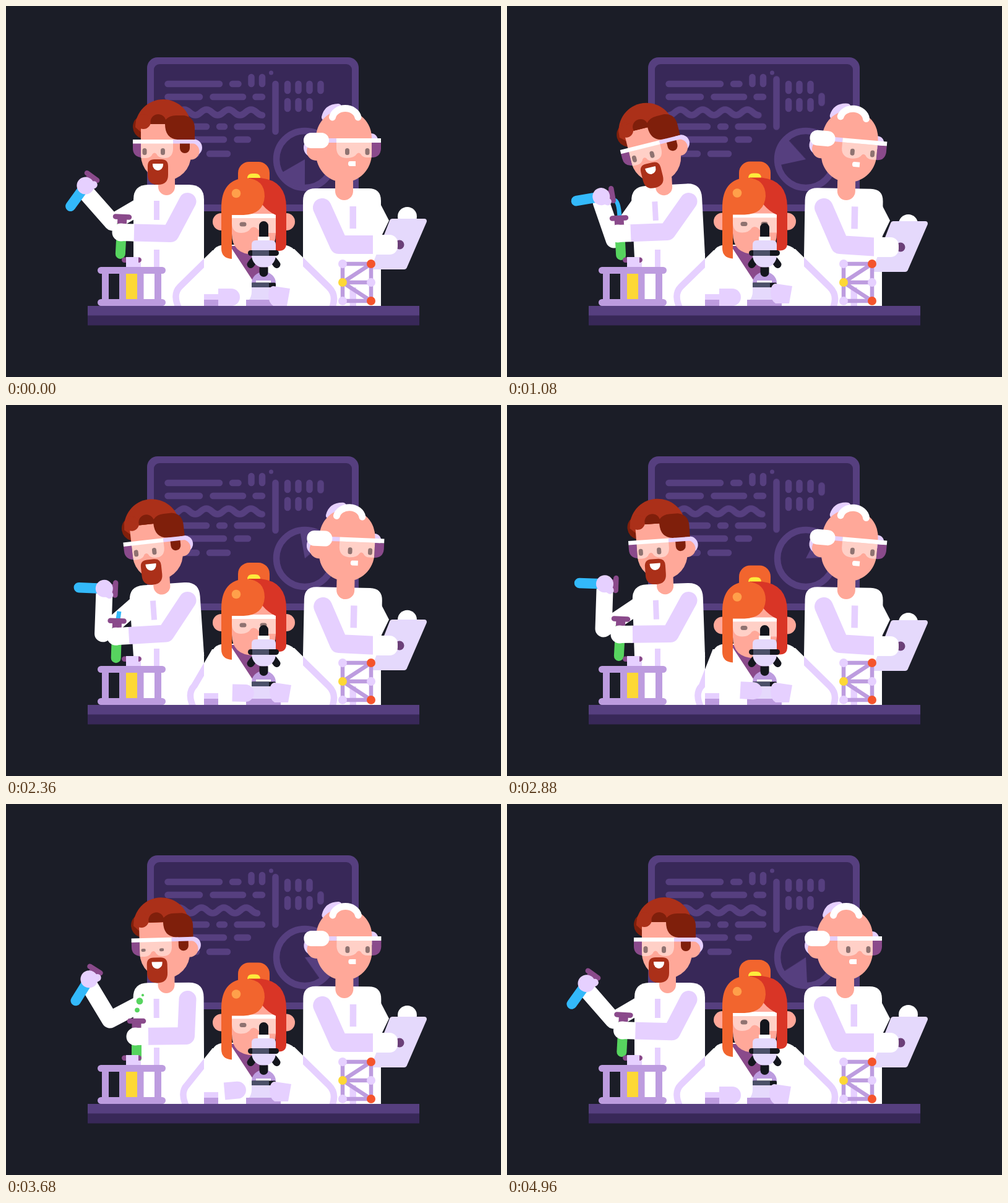
An HTML page that plays this animation: 800 px wide and 600 px high, repeating every 5000 ms.

```html
<!DOCTYPE html>
<html lang="en">
<head>
<meta charset="utf-8">
<title>Laboratory</title>
<style>
  html, body { margin: 0; width: 100%; height: 100%; overflow: hidden; background: #1b1d27; }
  svg { display: block; width: 100vw; height: 100vh; }
  .ln { fill: none; stroke-linecap: round; stroke-linejoin: round; }
  .white { fill: #fff; }
  .skin { fill: #ffa899; }
  .lav { fill: #e6d0ff; }
  .pale { fill: #e5d9fc; }
  .lilac { fill: #bd9cdf; }
  .plum { fill: #8a4a8b; }
  .black { fill: #14161d; }
  .slate { fill: #4b5068; }
  .glass { fill: #fff; opacity: .45; }
  .eye { fill: #8f7371; }
  .rust { fill: #ab3019; }
  .brown { fill: #7f1f0b; }
  .orange { fill: #f2652e; }
  .red { fill: #d93526; }
  .mid { fill: #563f7f; }
  .deep { fill: #382858; }
  .chalk { stroke: #563f7f; stroke-width: 10.5; }
  .sleeve { stroke: #e6d0ff; }
  .coat { stroke: #fff; }
  .green { fill: #57d45f; }
  #wedge { transform-origin: 483px 248px; animation: spin 5s linear infinite; }
  #wave { animation: left 1.25s cubic-bezier(.37,0,.63,1) infinite alternate; }
  #bar { animation: up 1.25s cubic-bezier(.37,0,.63,1) infinite alternate; }
  #pill { animation: down 1.25s cubic-bezier(.37,0,.63,1) infinite alternate; }
  @keyframes spin { to { transform: rotate(360deg); } }
  @keyframes left { to { transform: translateX(-8px); } }
  @keyframes up { to { transform: translateY(-8px); } }
  @keyframes down { to { transform: translateY(20.5px); } }
</style>
</head>
<body>
<svg viewBox="0 0 800 600">
  <defs>
    <clipPath id="coats"><path d="M200 380H320V485H200zM480 380H606V485H480z"/></clipPath>
  </defs>
  <rect width="800" height="600" fill="#1b1d27"/>

  <!-- board -->
  <rect class="mid" x="228" y="83" width="342" height="249" rx="17"/>
  <rect class="deep" x="239" y="94" width="320" height="227" rx="9"/>
  <g class="ln chalk">
    <path d="M261.500 126H345M366 126H375.500M396.500 115V126M414 115V126M261.500 147H313M334.500 147H383M403.500 147H414"/>
    <path d="M261.500 195H324M345 195H353M373.500 195H414M261.500 216H352M373.500 216H391M261.500 239H308M329 239H358"/>
    <path d="M455 126V137M472.500 126V137M490.500 126V137M455 154V166M472.500 154V166M490.500 154V166"/>
    <path id="wave" d="M270 176.500c8 0 10-9 18-9s10 9 18 9 10-9 18-9 10 9 18 9 10-9 18-9 10 9 18 9 10-9 18-9 10 9 18 9"/>
    <path id="bar" d="M435.500 126V203"/>
    <path id="pill" d="M508.500 126V137"/>
    <circle cx="483" cy="248" r="46"/>
  </g>
  <circle class="mid" cx="428.500" cy="108" r="3.500"/>
  <path id="wedge" class="mid" d="M483 248V295A47 47 0 0 1 442.300 271.500z"/>

  <!-- bearded man -->
  <path id="farArm" class="ln coat" stroke-width="27"/>
  <path class="white" d="M206 400H320V485H206z"/>
  <g id="manBody">
    <path class="white" d="M206 410V313Q206 289 230 289H296Q320 289 320 313V410z"/>
    <path class="lav" d="M239 315h9v31h-9z"/>
    <rect class="skin" x="246" y="265" width="27" height="41" rx="13.500"/>
  </g>
  <path class="lav" d="M239 394h9v30h-9z"/>
  <g id="manHead">
    <circle class="lav" cx="303.500" cy="229" r="13.500"/>
    <circle class="skin" cx="299" cy="235" r="13.500"/>
    <path class="brown" d="M226 178H218Q205 182 205 196Q206 209 218 214L232 200z"/>
    <path class="rust" d="M209 196A45 45 0 0 1 299 196L270 204H218z"/>
    <path class="skin" d="M218 191H299V241A40.500 41 0 0 1 218 241z"/>
    <circle class="rust" cx="222" cy="187" r="12"/>
    <path class="rust" d="M214 178H262V191H230z"/>
    <path class="brown" d="M234 191A12 12 0 0 1 258 184Q264 177 275 177H288Q305 180 305 198V216H277Q257 214 257 191z"/>
    <path class="brown" d="M281 214h16v16a8 8 0 0 1-16 0z"/>
    <path class="plum" d="M205 222H218V245Q205 243 205 230z"/>
    <path class="glass" d="M218 222H270V232Q269 246 256 246Q246 246 243 239Q240 236 237 239Q234 246 226 246H218z"/>
    <rect class="lav" x="270" y="216" width="35" height="6.500"/>
    <rect class="white" x="205" y="216" width="65" height="6.500"/>
    <g id="manEyes">
      <rect class="eye" x="220.500" y="230" width="7" height="11" rx="3.500"/>
      <rect class="eye" x="250" y="230" width="7" height="11" rx="3.500"/>
    </g>
    <path class="rust" d="M229 259Q229 248 240 248H251Q262 248 262 259V273Q262 289 245.500 289Q229 289 229 273z"/>
    <path class="white" d="M237 255H254V257A8.500 9 0 0 1 237 257z"/>
  </g>
  <path id="stream" fill="none" stroke="#33b9fa" stroke-width="7" pathLength="1" stroke-dasharray="1 1"/>
  <g id="flask">
    <path class="ln" d="M16 0H59" stroke="#33b9fa" stroke-width="16.500"/>
    <rect class="plum" y="-7.500" width="13" height="15"/>
    <path class="ln" d="M0 -10V10" stroke="#8a4a8b" stroke-width="8.500"/>
    <path class="ln sleeve" d="M16 -6L9 -10" stroke-width="12"/>
    <circle class="lav" cx="18" r="14"/>
  </g>
  <g class="green"><circle class="bub"/><circle class="bub"/><circle class="bub"/></g>
  <path id="nearArm" class="ln sleeve" stroke-width="28"/>
  <g id="tube">
    <path class="green" d="M-8 11H8V60a8 8 0 0 1-16 0z"/>
    <rect class="plum" x="-7.500" width="15" height="12"/>
    <path class="ln" d="M-11 0H11" stroke="#8a4a8b" stroke-width="8.500"/>
  </g>
  <path id="cuff" class="coat" stroke-width="28"/>
  <circle id="glove" class="white" r="14.500"/>

  <!-- older man -->
  <path class="white" d="M480 400H606V485H480z"/>
  <g id="oldBody">
    <path class="white" d="M480 410V315Q480 295 500 295H586Q606 295 606 315V410z"/>
    <path class="lav" d="M555.500 324h10.500v36h-10.500z"/>
    <rect class="skin" x="532" y="270" width="29" height="44" rx="14.500"/>
  </g>
  <path class="lav" d="M555.500 455h10.500v30h-10.500z"/>
  <g id="oldHead">
    <circle class="lav" cx="590" cy="217" r="11"/>
    <circle class="lav" cx="497" cy="229" r="16"/>
    <circle class="skin" cx="501" cy="235" r="15"/>
    <path class="ln sleeve" d="M515.500 180Q519 164 537 163.500" stroke-width="11"/>
    <path class="skin" d="M501 213A45 45 0 0 1 591 213V239A45 46 0 0 1 501 239z"/>
    <path class="ln coat" d="M527.500 180A21 17 0 0 1 569 180" stroke-width="11"/>
    <path class="plum" d="M591 221H606V231Q605 245 591 245z"/>
    <path class="glass" d="M534 221H591V245H584Q576 245 573 239Q570 236 567 239Q563 246 550 246Q535 245 534 231z"/>
    <rect class="lav" x="518" y="214" width="16" height="7"/>
    <rect class="white" x="534" y="214" width="72" height="7"/>
    <rect class="white" x="481" y="205" width="41" height="25" rx="12"/>
    <rect class="eye" x="548" y="230" width="7" height="11" rx="3.500"/>
    <rect class="eye" x="580.500" y="230" width="7" height="11" rx="3.500"/>
    <path class="white" d="M556 251H565V259H556Q553 259 553 255Q553 251 556 251z"/>
  </g>
  <path class="white" d="M604 318L619 347L604 378z"/>
  <circle id="fingers" class="white" cx="648.500" cy="340.500" r="15.500"/>
  <g id="clip">
    <path class="pale" d="M624 348H676L644 422H595z" stroke="#e5d9fc" stroke-width="8" stroke-linejoin="round"/>
    <circle cx="636" cy="386" r="7.500" fill="#6b3f78"/>
  </g>
  <path id="oldArm" class="ln sleeve" stroke-width="30"/>
  <g id="oldGlove">
    <rect class="white" x="593" y="370" width="40" height="32" rx="13"/>
    <rect class="white" x="593" y="370" width="20" height="32"/>
  </g>

  <!-- woman -->
  <path id="armFill" class="white coat" stroke-width="10"/>
  <path id="armEdge" class="ln sleeve" stroke-width="10.500" clip-path="url(#coats)"/>
  <path class="white" d="M331 485V412Q331 386 355 386H447Q471 388 471 412V485z"/>
  <path class="plum" d="M362 388L400 446H412L438 388z"/>
  <g id="girl">
    <rect class="orange" x="375" y="252" width="51" height="45" rx="18"/>
    <path d="M390 281V279Q390 271 398 271H403Q411 271 411 279V281z" fill="#fdeb3b"/>
    <circle class="skin" cx="348" cy="349" r="14"/>
    <circle class="skin" cx="453" cy="349" r="14"/>
    <path class="skin" d="M365 310H436V368Q436 402 400 402Q365 401 365 368z"/>
    <path class="glass" d="M365 343H436V367H422Q410 366 405 359Q400 356 396 359Q391 367 380 367Q366 367 365 352z"/>
    <rect class="white" x="365" y="336" width="71" height="7"/>
    <rect class="eye" x="377.500" y="349.500" width="11" height="7" rx="3.500"/>
    <rect class="eye" x="410.500" y="349.500" width="11" height="7" rx="3.500"/>
    <path class="red" d="M392 278H411Q453 282 453 326V384Q453 396 441 396H436V338Q424 333 414 321L392 310z"/>
    <path class="orange" d="M348 326Q348 280 388 278Q418 280 418 308Q416 337 384 338H365V409Q348 408 348 392z"/>
    <circle cx="372" cy="303" r="7.300" fill="#ffa04a"/>
  </g>
  <rect class="lav" x="320" y="466" width="23" height="10"/>
  <rect class="lilac" x="320" y="475" width="23" height="10"/>

  <!-- microscope -->
  <path id="ocular" class="black" d="M409 380V355.500a7.500 7.500 0 0 1 15 0V380z"/>
  <rect class="white" x="407" y="373" width="19" height="9"/>
  <path class="ln" d="M400 412L395.500 418M433 412L437.500 418" stroke="#14161d" stroke-width="12"/>
  <path class="pale" d="M397 396V386Q397 379 404 379H429Q436 379 436 386V403A19.500 20 0 0 1 397 403z"/>
  <rect class="black" x="391" y="395" width="50" height="9" rx="4.500"/>
  <rect class="slate" x="398" y="395" width="27" height="9"/>
  <path d="M397 448A19.500 18 0 0 1 436 448z" class="lilac"/>
  <path class="black" d="M409.500 422.500H423.500V431a7 7 0 0 1-14 0z"/>
  <rect class="white" x="404" y="444" width="24" height="4"/>
  <rect class="black" x="397" y="447.500" width="39" height="7.500" rx="2"/>
  <rect class="slate" x="397" y="447.500" width="28" height="7.500"/>
  <path class="pale" d="M397 455H436V476H392Q397 470 397 462z"/>
  <rect class="lilac" x="388" y="475" width="56" height="10"/>
  <path id="leftHand" class="lav" d="M343 457H364A14 14 0 0 1 364 485H343z"/>
  <path id="rightHand" class="lav" d="M432 453L459 457L454 485H432Q424 480 424 467Q425 453 432 453z"/>

  <!-- rack -->
  <rect class="plum" x="187" y="406.500" width="32" height="8.500" rx="4.200"/>
  <path class="lav" d="M194 406H214V415H218V424H194z"/>
  <rect x="166" y="433" width="17" height="42" fill="#1b1d27"/>
  <rect x="194" y="433" width="18" height="42" fill="#fdd835"/>
  <path class="lilac" d="M155 428h11v50h-11zM183 428h11v50h-11zM212 428h10.500v50h-10.500zM240 428h11v50h-11z"/>
  <rect class="lilac" x="148" y="422" width="110" height="11" rx="5.500"/>
  <rect class="lilac" x="148" y="474" width="110" height="11" rx="5.500"/>

  <!-- molecule -->
  <path d="M544 417H590V477H544zM590 417L544 447L590 477M544 447H590" fill="none" stroke="#bd9cdf" stroke-width="6.500"/>
  <g class="lav"><circle cx="544" cy="417" r="7"/><circle cx="590" cy="447" r="7"/><circle cx="544" cy="477" r="7"/></g>
  <g fill="#f4542c"><circle cx="590" cy="417" r="7"/><circle cx="590" cy="477" r="7"/></g>
  <circle cx="544" cy="447" r="7" fill="#fdd835"/>

  <!-- table -->
  <rect class="mid" x="132" y="485" width="536" height="16"/>
  <rect class="deep" x="132" y="500.500" width="536" height="16"/>
</svg>
<script>
const LOOP = 5000;
const BEATS = [0, 1080, 1880, 2880, 3680, 4280];
const POUR = [0, 600, 1080, 1880, 2880, 3680, 4280];
const $ = id => document.getElementById(id);
const set = (id, name, value) => $(id).setAttribute(name, value);
const move = (id, value) => set(id, 'transform', value);
const clamp = v => Math.max(0, Math.min(1, v));

// Periodic monotone cubic through the given values.
function track(v, times = BEATS) {
  const n = v.length;
  const at = i => times[(i + n) % n] + LOOP * Math.floor(i / n);
  const val = i => v[(i + n) % n];
  const slope = i => (val(i + 1) - val(i)) / (at(i + 1) - at(i));
  const tangent = i => {
    const a = slope(i - 1), b = slope(i);
    return a * b <= 0 ? 0 : 2 * a * b / (a + b);
  };
  return t => {
    let i = n - 1;
    while (times[i] > t) i--;
    const h = at(i + 1) - at(i), u = (t - at(i)) / h, w = 1 - u;
    return val(i) * w * w * (1 + 2 * u) + val(i + 1) * u * u * (3 - 2 * u)
      + h * u * w * (tangent(i) * w - tangent((i + 1) % n) * u);
  };
}

const tracks = {
  lean: track([0, -6, -10, -4, -.5, 0]),
  nod: track([0, -14, -9, -4, -1.5, 0]),
  drop: track([0, 1.5, 0, 0, 0, 0]),
  capX: track([139, 165, 170, 177, 176, 144, 141], POUR),
  capY: track([276, 297, 305, 302, 290, 268, 271], POUR),
  tip: track([126, 156, 170, 182.5, 182, 122, 122], POUR),
  farX: track([172, 173, 158, 156, 168, 170]),
  farY: track([350, 378, 375, 362, 349, 350]),
  tubeX: track([188, 181, 178, 184, 211, 205]),
  tubeY: track([341, 343, 352, 346, 351, 350]),
  tubeTilt: track([3, -3, 0, 3, 0, 0]),
  elbowX: track([266, 259, 256, 264, 291, 284]),
  elbowY: track([368, 365, 369, 370, 375, 374]),
  oldLean: track([0, 2, 2.5, 2, .4, .5]),
  oldNod: track([0, 5, 0, 5, 0, 2]),
  clip: track([0, 4, 2, 4, 0, 2.5]),
  fingers: track([0, 12, 3, 11, 1, 9]),
  girl: track([0, -.5, -1, 7.5, 4.5, 2]),
  ocular: track([0, 3, 8, 8, 5, 2]),
  arm: track([0, 0, 10, 34, 12, 0]),
  handX: track([0, 0, 9, 34, 10, 0]),
  handY: track([0, 0, -1, -9, -8, 0]),
  handTilt: track([0, 0, 0, 3, -5, 0]),
  grip: track([0, 1, 1, 1, 1, 0])
};

// start time, x at the top of the rise, largest radius
const bubbles = [[3410, 216, 5.5], [3560, 212, 6.5], [3310, 221, 2.2]];
const dots = document.querySelectorAll('.bub');

const sway = (dx, x) => `rotate(${dx / 2} ${x} 405)`;
const blink = (t, mid) => clamp(1 - Math.abs(t - mid) / 120);

function drawMan(p, t) {
  move('manBody', sway(p.lean, 263));
  move('manHead', `translate(${p.lean} ${p.drop}) rotate(${p.nod} 260 290)`);
  move('manEyes', `translate(0 235.500) scale(1 ${1 - blink(t, 1880) - blink(t, 3735)}) translate(0 -235.500)`);

  const a = p.tip * Math.PI / 180;
  const hx = p.capX + 18 * Math.cos(a), hy = p.capY + 18 * Math.sin(a);
  move('flask', `translate(${p.capX} ${p.capY}) rotate(${p.tip})`);
  set('farArm', 'd', `M${hx} ${hy + 10}L${p.farX} ${p.farY}L${218 + p.lean} 323`);

  const pouring = t > 900 && t < 2420;
  set('stream', 'display', pouring ? 'inline' : 'none');
  set('stream', 'd', `M${p.capX + 3} ${p.capY + 9}Q${p.capX + 11} ${p.capY + 9} ${p.tubeX + 1} ${p.tubeY}`);
  set('stream', 'stroke-dashoffset', 1 - clamp((t - 900) / 150) - clamp((t - 2250) / 170));

  const gx = p.tubeX - 2, gy = p.tubeY + 25;
  const len = Math.hypot(p.elbowX - gx, p.elbowY - gy);
  const cx = gx + 21 * (p.elbowX - gx) / len, cy = gy + 21 * (p.elbowY - gy) / len;
  move('tube', `translate(${p.tubeX} ${p.tubeY}) rotate(${p.tubeTilt})`);
  set('nearArm', 'd', `M293.500 316L${p.elbowX} ${p.elbowY}L${cx} ${cy}`);
  set('cuff', 'd', `M${gx} ${gy}L${cx} ${cy}`);
  move('glove', `translate(${gx} ${gy})`);

  bubbles.forEach(([start, x, r], i) => {
    const u = clamp((t - start) / 600);
    dots[i].setAttribute('cx', x);
    dots[i].setAttribute('cy', 345 - 58 * u);
    dots[i].setAttribute('r', r * Math.sin(Math.PI * u));
  });
}

function drawOld(p) {
  move('oldBody', sway(p.oldLean, 543));
  move('oldHead', `translate(${p.oldLean} 0) rotate(${p.oldNod} 546 290)`);
  move('clip', `translate(0 ${p.clip})`);
  move('oldGlove', `translate(0 ${p.clip})`);
  move('fingers', `translate(0 ${p.fingers})`);
  set('oldArm', 'd', `M${511 + p.oldLean / 2} 326L538 386L600 ${386 + p.clip}`);
}

function drawWoman(p) {
  const e = p.arm;
  const left = `M336 400L${281 + e} 454Q${269 + e} 466 ${279 + e} 488`;
  set('armEdge', 'd', left + 'M464 398L522 455Q535 468 527 488');
  set('armFill', 'd', left + 'L527 488Q535 468 522 455L464 398z');
  move('girl', `translate(0 ${p.girl})`);
  move('ocular', `translate(0 ${p.ocular})`);
  move('leftHand', `translate(${p.handX} ${p.handY}) rotate(${p.handTilt} 360 471)`);
  move('rightHand', `translate(${2 * p.grip} ${-4 * p.grip})`);
}

function frame(now) {
  const t = now % LOOP, p = {};
  for (const key in tracks) p[key] = tracks[key](t);
  drawMan(p, t);
  drawOld(p);
  drawWoman(p);
  requestAnimationFrame(frame);
}
frame(performance.now());
</script>
</body>
</html>
```
